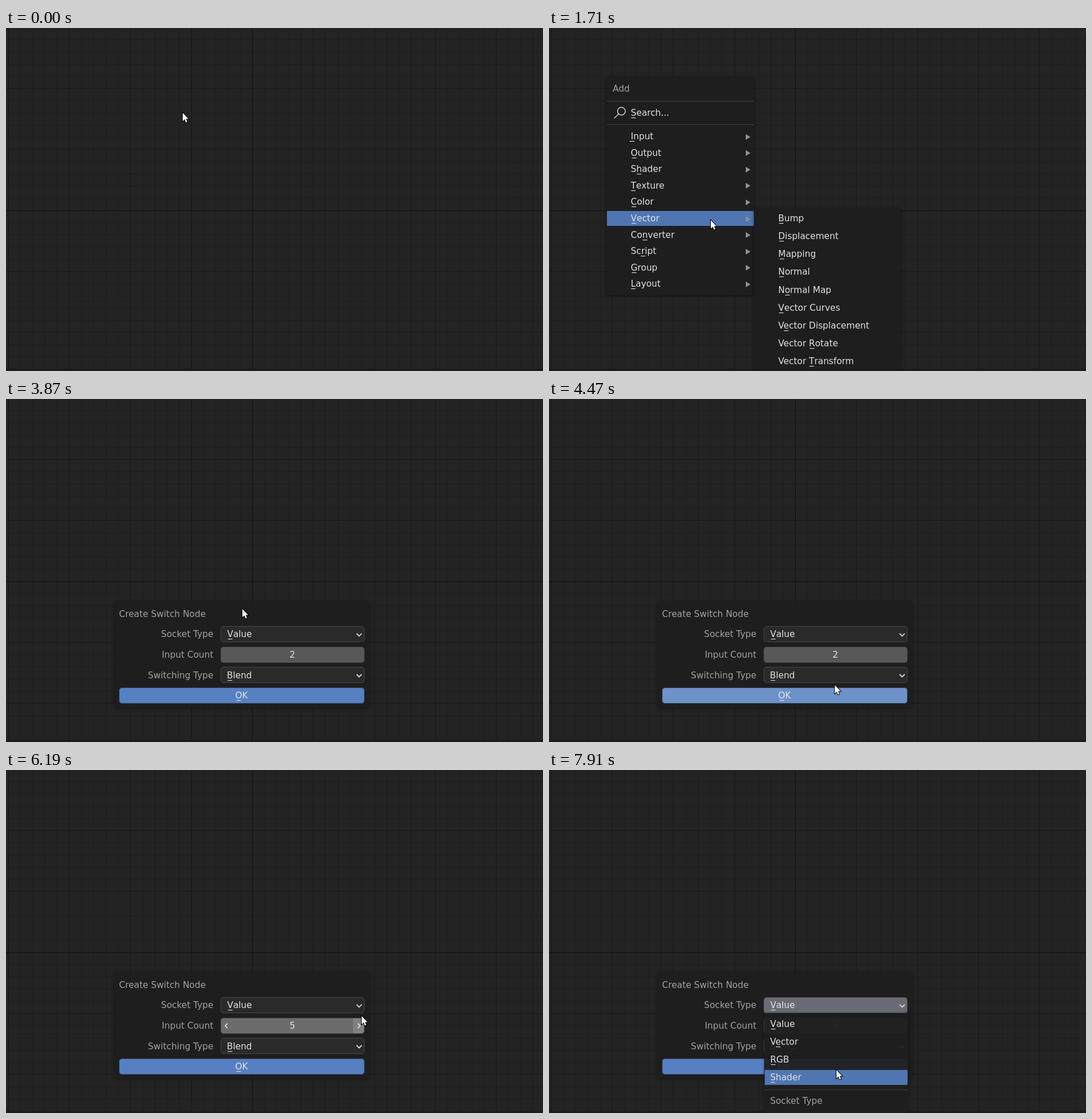
Animation, 936 px wide and 598 px high, one loop 8 s. Source, as an HTML page:

```html
<!DOCTYPE html>
<html lang="en">
<head>
<meta charset="utf-8">
<title>Add switch node</title>
<style>
html, body { margin: 0; width: 100%; height: 100%; overflow: hidden; background: #232323; }
#stage {
  position: relative; width: 936px; height: 598px; overflow: hidden;
  font: 15.3px/20px "DejaVu Sans", sans-serif; color: #e2e2e2; white-space: pre;
}
#stage div, #stage svg { position: absolute; box-sizing: border-box; }
.layer, #grid { left: 0; top: 0; width: 936px; height: 598px; }
.panel { background: rgba(30, 30, 30, .945); border-radius: 5px; box-shadow: 0 1px 5px rgba(0, 0, 0, .42); }
.rule { height: 1px; background: #434343; }
.bar { top: 0; height: 26px; background: #4f76b3; }
.dim { color: #a2a2a2; }
.right { transform: translateX(-100%); }
.mid { transform: translateX(-50%); }
.arrow { border: 5px solid transparent; border-left: 8.5px solid #929292; border-right: 0; }

/* accelerator letter */
u { position: relative; text-decoration: none; }
u::after { content: "_"; position: absolute; left: 50%; top: 0; line-height: normal; transform: translateX(-50%); }

.field { left: 374px; width: 251px; height: 28px; border: 1px solid #474747; border-radius: 5px; background: #2a2a2a; }
.hot { inset: 0; border-radius: 4px; }
#count { background: #585858; }
#ok { left: 197px; top: 503px; width: 428px; height: 28px; background: #5680c2; border: 1px solid #3d4b63; border-radius: 5px; }
#reel { width: 20px; height: 20px; left: 489px; top: 436px; overflow: hidden; text-align: center; }
#digits { width: 20px; }
.line { fill: none; stroke: #dcdcdc; stroke-width: 1.8; }

/* hard changes hold until the next key */
.cut { animation: 8s step-end infinite; }
#menu { animation-name: menu; }
#menuBar { animation-name: menuBar; left: 101px; width: 256px; }
#vector { animation-name: vector; }
#converter { animation-name: converter; }
#switchBar { animation-name: switchBar; left: 358px; width: 255px; top: 347px; height: 27px; }
#dialog { animation-name: dialog; }
#socketHot { animation-name: socketHot; background: rgba(255, 255, 255, .1); }
#countHot { animation-name: countHot; background: #6c6c6c; }
#stepHot { animation-name: stepHot; left: 605px; top: 433px; width: 19px; height: 26px; background: #808080; border-radius: 0 4px 4px 0; }
#chevrons { animation-name: countHot; }
#switchHot { animation-name: switchHot; background: rgba(255, 255, 255, .1); }
#okHot { animation-name: okHot; background: rgba(255, 255, 255, .14); }
#digits { animation-name: digits; }
#drop, #opened { animation-name: drop; }
#opened { background: #6a6c74; border-radius: 4px 4px 0 0; }
#dropBar { animation-name: dropBar; left: 376px; width: 249px; }
#cursor { left: 0; top: 0; overflow: visible; animation: cursor 8s linear infinite; }

@keyframes menu { 0%, 42.625% { opacity: 0 } 4.375% { opacity: 1 } }
@keyframes menuBar {
  0% { transform: translateY(135px); opacity: 1 }
  13.5% { transform: translateY(176px) }
  15.5% { opacity: 0 }
  16.375% { transform: translateY(205px); opacity: 1 }
  17.25% { transform: translateY(234px) }
  18.125% { transform: translateY(262px) }
  19% { transform: translateY(291px) }
  19.75% { transform: translateY(319px) }
  24.375% { transform: translateY(348px) }
}
@keyframes vector { 0%, 25% { opacity: 0 } 21.375% { opacity: 1 } }
@keyframes converter { 0%, 42.625% { opacity: 0 } 26% { opacity: 1 } }
@keyframes switchBar { 0%, 42.625% { opacity: 0 } 37.375% { opacity: 1 } }
@keyframes dialog { 0% { opacity: 0 } 42.625%, 100% { opacity: 1 } }
@keyframes socketHot { 0%, 50.75%, 84.375% { opacity: 0 } 50%, 79.125% { opacity: 1 } }
@keyframes countHot { 0%, 52%, 78.25% { opacity: 0 } 51%, 58.5% { opacity: 1 } }
@keyframes stepHot { 0%, 78.25% { opacity: 0 } 60.25% { opacity: 1 } }
@keyframes switchHot { 0%, 53.25%, 57.5% { opacity: 0 } 52.125%, 56.5% { opacity: 1 } }
@keyframes okHot { 0%, 56% { opacity: 0 } 53.5% { opacity: 1 } }
@keyframes digits {
  0% { transform: none }
  69.5% { transform: translateY(-20px) }
  72% { transform: translateY(-40px) }
  74.5% { transform: translateY(-60px) }
}
@keyframes drop { 0% { opacity: 0 } 84.375%, 100% { opacity: 1 } }
@keyframes dropBar {
  0% { opacity: 0; transform: translateY(430px) }
  89.375% { opacity: 1; transform: translateY(430px) }
  90.625% { opacity: 1; transform: translateY(461px) }
  95.375% { opacity: 1; transform: translateY(492px) }
  98%, 100% { opacity: 1; transform: translateY(523px) }
}
@keyframes cursor {
  0% { transform: translate(308px, 148px) }
  11.25% { transform: translate(308px, 150px) }
  13.25% { transform: translate(303px, 172px) }
  15.5%, 16.25% { transform: translate(293px, 209px) }
  17.25% { transform: translate(289px, 246px) }
  18.125% { transform: translate(288px, 272px) }
  19% { transform: translate(286px, 300px) }
  20.5% { transform: translate(283px, 333px) }
  22.25% { transform: translate(281px, 337px) }
  25% { transform: translate(276px, 350px) }
  28.125%, 33.125% { transform: translate(273px, 351px) }
  33.75% { transform: translate(292px, 360px) }
  35.625% { transform: translate(330px, 374px) }
  37.5% { transform: translate(366px, 374px) }
  39.25% { transform: translate(395px, 370px) }
  41%, 49.125% { transform: translate(412px, 366px) }
  50.75% { transform: translate(418px, 430px) }
  52.5% { transform: translate(425px, 485px) }
  53.75% { transform: translate(432px, 510px) }
  55.25% { transform: translate(470px, 509px) }
  57.625% { transform: translate(575px, 471px) }
  58.5% { transform: translate(592px, 460px) }
  60.25% { transform: translate(608px, 457px) }
  62.5% { transform: translate(618px, 454px) }
  66.25%, 68.75% { transform: translate(620px, 455px) }
  73.75% { transform: translate(621px, 451px) }
  76.5% { transform: translate(620px, 440px) }
  77.375%, 78.125% { transform: translate(620px, 429px) }
  78.25% { transform: translate(619px, 426px) }
  79.125% { transform: translate(614px, 420px) }
  81.25% { transform: translate(580px, 412px) }
  84.375% { transform: translate(548px, 412px) }
  88.5% { transform: translate(533px, 424px) }
  89.375% { transform: translate(530px, 436px) }
  90.625% { transform: translate(522px, 470px) }
  92%, 94.5% { transform: translate(518px, 486px) }
  96.5% { transform: translate(508px, 508px) }
  98.875%, 100% { transform: translate(501px, 523px) }
}
</style>
</head>
<body>
<div id="stage">
  <svg id="grid" shape-rendering="crispEdges"></svg>

  <div id="menu" class="layer cut">
    <div class="panel" style="left:100px;top:86px;width:258px;height:380px"></div>
    <div class="rule" style="left:101px;top:127px;width:256px"></div>
    <div class="rule" style="left:101px;top:168px;width:256px"></div>
    <div id="menuBar" class="bar cut"></div>
    <svg class="layer"><path class="line" style="stroke-width:1.5;stroke:#cfcfcf" d="M133 145a6.8 6.8 0 1 0-13.6 0a6.8 6.8 0 1 0 13.6 0M121.4 149.8L113.5 157.5"/></svg>
  </div>

  <div id="vector" class="layer cut">
    <div class="panel" style="left:357px;top:314px;width:257px;height:283px"></div>
  </div>

  <div id="converter" class="layer cut">
    <div class="panel" style="left:357px;top:-120px;width:257px;height:500px"></div>
    <div id="switchBar" class="bar cut"></div>
  </div>

  <div id="dialog" class="layer cut">
    <div class="panel" style="left:189px;top:353px;width:444px;height:185px"></div>
    <div class="field" style="top:396px"><div id="socketHot" class="hot cut"></div><div id="opened" class="hot cut"></div></div>
    <div class="field" id="count" style="top:432px"><div id="countHot" class="hot cut"></div></div>
    <div id="stepHot" class="cut"></div>
    <div class="field" style="top:467px"><div id="switchHot" class="hot cut"></div></div>
    <div id="ok"><div id="okHot" class="hot cut"></div></div>
    <svg class="layer">
      <path class="line" d="M611 408.8l4.5 4.5l4.5-4.5M611 480l4.5 4.5l4.5-4.5"/>
      <path id="chevrons" class="line cut" d="M386 442l-4 4l4 4M613.3 442l4 4l-4 4"/>
    </svg>
    <div id="reel"><div id="digits" class="cut">2<br>3<br>4<br>5</div></div>
  </div>

  <div id="drop" class="layer cut">
    <div class="panel" style="left:375px;top:424px;width:251px;height:200px;border-radius:0"></div>
    <div id="dropBar" class="bar cut"></div>
    <div class="rule" style="left:376px;top:557px;width:249px"></div>
  </div>

  <svg id="cursor" width="12" height="20">
    <path d="M0 0V14.5L3.4 11.3L5.6 16.4L7.9 15.4L5.7 10.4H10Z" fill="#fff" stroke="#000" stroke-width="2" paint-order="stroke"/>
  </svg>
</div>

<script>
const $ = id => document.getElementById(id);

function put(layer, cls, x, y, html = "") {
  const el = document.createElement("div");
  el.className = cls;
  el.style.left = x + "px";
  el.style.top = y + "px";
  el.innerHTML = html;
  $(layer).append(el);
}

// "_" marks the accelerator letter; y is the middle of the line
function text(layer, x, y, label, cls = "") {
  put(layer, cls, x, y - 10, label.replace(/_(.)/, "<u>$1</u>"));
}

function list(layer, x, y, pitch, labels) {
  labels.split(",").forEach((label, i) => text(layer, x, y + i * pitch, label));
}

function drawGrid() {
  const step = 21.265, paths = ["", "", ""];
  const level = i => i === 0 ? 2 : i % 5 === 0 ? 1 : 0;
  for (let i = -20; i <= 23; i++) {
    paths[level(i)] += `M${Math.floor(429.4 + i * step)}.5 0V598`;
    if (Math.abs(i) < 15) paths[level(i)] += `M0 ${Math.floor(318.2 + i * step)}.5H936`;
  }
  $("grid").innerHTML = paths.map((d, i) =>
    `<path d="${d}" stroke="${["#1d1d1d", "#171717", "#0f0f0f"][i]}"/>`).join("") +
    '<rect y="594" width="936" height="4" fill="#1c1c1c"/>';
}

drawGrid();

text("menu", 111, 106, "Add", "dim");
text("menu", 142.5, 148, "_Search...");
list("menu", 142.5, 189, 28.6,
  "_Input,_Output,S_hader,_Texture,_Color,_Vector,Co_nverter,Sc_ript,_Group,_Layout");
for (let i = 0; i < 10; i++) put("menu", "arrow", 343, 184.5 + i * 28.6);

list("vector", 399.5, 332, 31.15,
  "_Bump,_Displacement,_Mapping,_Normal,N_ormal Map,_Vector Curves,V_ector Displacement,Vector _Rotate,Vector _Transform");
list("converter", 399.5, -6, 31.15,
  "Combine _XYZ,_Map Range,M_ath,RGB _to BW,_Separate HSV,S_eparate RGB,Se_parate XYZ,Sha_der to RGB,_Vector Math,_Wavelength");
list("converter", 399.5, 303, 28.6, "Value _Lerp,Vector Lerp,Switch _Node");

text("dialog", 197, 374.5, "Create Switch Node", "dim");
["Socket Type", "Input Count", "Switching Type"].forEach((label, i) =>
  text("dialog", 361.5, 410.3 + i * 35.6, label, "dim right"));
text("dialog", 385.5, 410.3, "_Value");
text("dialog", 385, 481.5, "_Blend");
text("dialog", 410.5, 517, "_OK", "mid");

list("drop", 385.5, 442.5, 31.15, "_Value,V_ector,_RGB,_Shader");
text("drop", 385.5, 577, "Socket Type", "dim");
</script>
</body>
</html>
```
